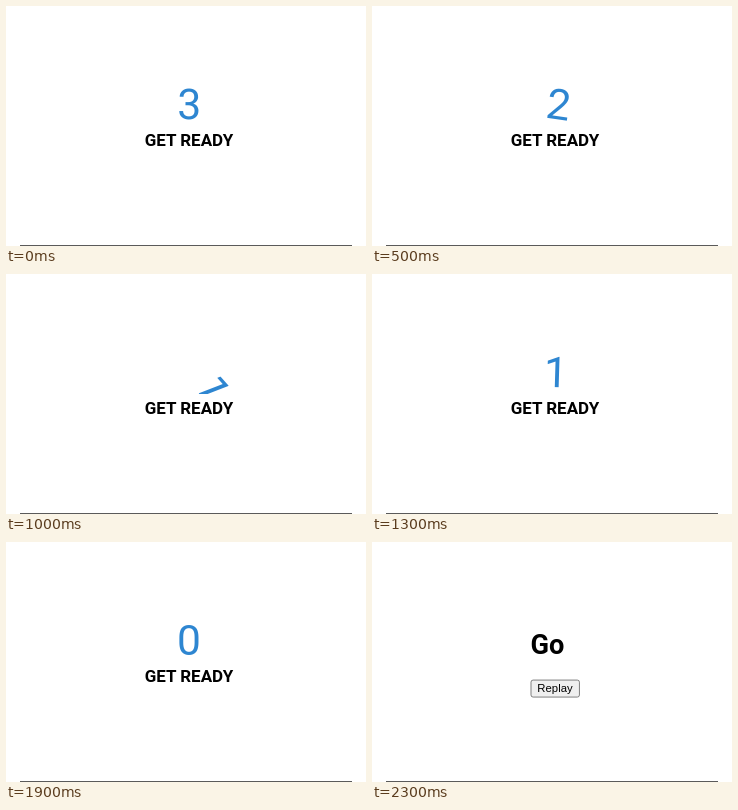
Animation, 360 px wide and 240 px high, one loop 2400 ms. Source, as an HTML page:

```html
<!DOCTYPE html>
<html lang="en">
<head>
<meta charset="utf-8">
<title>Countdown</title>
<style>
  html, body { margin: 0; width: 100%; height: 100%; overflow: hidden; background: #fff; }
  #stage { position: relative; width: 360px; height: 240px; overflow: hidden; color: #000; font-family: Roboto, sans-serif; }
  .panel { position: absolute; left: 182.5px; top: 112.9px; }
  .nums { position: relative; width: 250px; height: 50px; overflow: hidden; color: #2e86d1; font-size: 50px; line-height: 58.6px; }
  .nums span { position: absolute; left: 50%; top: 50%; transform-origin: bottom center; }
  h4 { margin: 5px 0; font-size: 20px; line-height: 23.4px; font-weight: 700; text-align: center; }
  #final { height: 102px; }
  h1 { margin: 21.4px 0; font-size: 32px; line-height: 37.5px; font-weight: 700; }
  .btn { box-sizing: border-box; height: 21px; padding: 2px 7px; border: 1px solid #6b6b6b; border-radius: 3px; background: #efefef;
         font: 13.333px/15px "Liberation Sans", Arial, sans-serif; white-space: nowrap; }
  .rule { position: absolute; left: 14px; top: 239px; width: 332px; height: 1px; background: #5a5a5a; }
</style>
</head>
<body>
<div id="stage">
  <div class="panel" id="counter">
    <div class="nums"><span>3</span><span>2</span><span>1</span><span>0</span></div>
    <h4>GET READY</h4>
  </div>
  <div class="panel" id="final">
    <h1>Go</h1>
    <div class="btn">Replay</div>
  </div>
  <div class="rule"></div>
</div>
<script>
const LOOP = 2400, STEP = 100, SPEED = 1.66, SIZE = 0.85;
const STARTS = [-322, 335, 962, 1589];
const FINISH = 1909;

// Tracks are [progress, value] pairs, eased between neighbours.
const SWING_IN = [[0, 120], [0.3, -20], [0.6, 10], [1, 0]];
const SWING_OUT = [[0, 0], [0.6, 20], [1, -120]];
const SHRINK = [[0, 1], [1, 0]];
const POP = [[0, 0], [0.3, 1.4], [1, 1]];

const counter = document.getElementById('counter');
const final = document.getElementById('final');
const digits = [...document.querySelectorAll('.nums span')];

function bezier(x1, x2) {
  const at = (u, a, b) => 3 * u * (1 - u) * (1 - u) * a + 3 * u * u * (1 - u) * b + u * u * u;
  return x => {
    let lo = 0, hi = 1;
    for (let i = 0; i < 24; i++) {
      const mid = (lo + hi) / 2;
      if (at(mid, x1, x2) < x) lo = mid; else hi = mid;
    }
    return at(lo, 0, 1);
  };
}
const easeInOut = bezier(0.42, 0.58);
const easeOut = bezier(0, 0.58);

function track(keys, p, ease) {
  p = Math.min(1, Math.max(0, p));
  const i = Math.max(1, keys.findIndex(k => k[0] >= p));
  const [p0, v0] = keys[i - 1], [p1, v1] = keys[i];
  return v0 + (v1 - v0) * ease((p - p0) / (p1 - p0));
}

function angle(age, last) {
  if (age < 500 || last) return track(SWING_IN, age / 500, easeInOut);
  return track(SWING_OUT, (age - 500) / 500, easeInOut);
}

function setScale(el, s) {
  el.style.visibility = s > 0.001 ? 'visible' : 'hidden';
  el.style.transform = `translate(-50%, -50%) scale(${SIZE * s})`;
}

function draw(t) {
  digits.forEach((el, i) => {
    const last = i === digits.length - 1;
    const age = (t - STARTS[i]) * SPEED;
    const live = age >= 0 && (last || age < 1000);
    el.style.display = live ? 'block' : 'none';
    if (live) el.style.transform = `translate(-50%, -50%) rotate(${angle(age, last)}deg)`;
  });
  const p = (t - FINISH) * SPEED / 200;
  setScale(counter, track(SHRINK, p, easeOut));
  setScale(final, track(POP, p, easeOut));
}

const begin = performance.now();
function tick(now) {
  const t = Math.max(0, now - begin) + 4;
  draw(Math.floor(t / STEP) * STEP % LOOP);
  requestAnimationFrame(tick);
}
draw(0);
requestAnimationFrame(tick);
</script>
</body>
</html>
```
